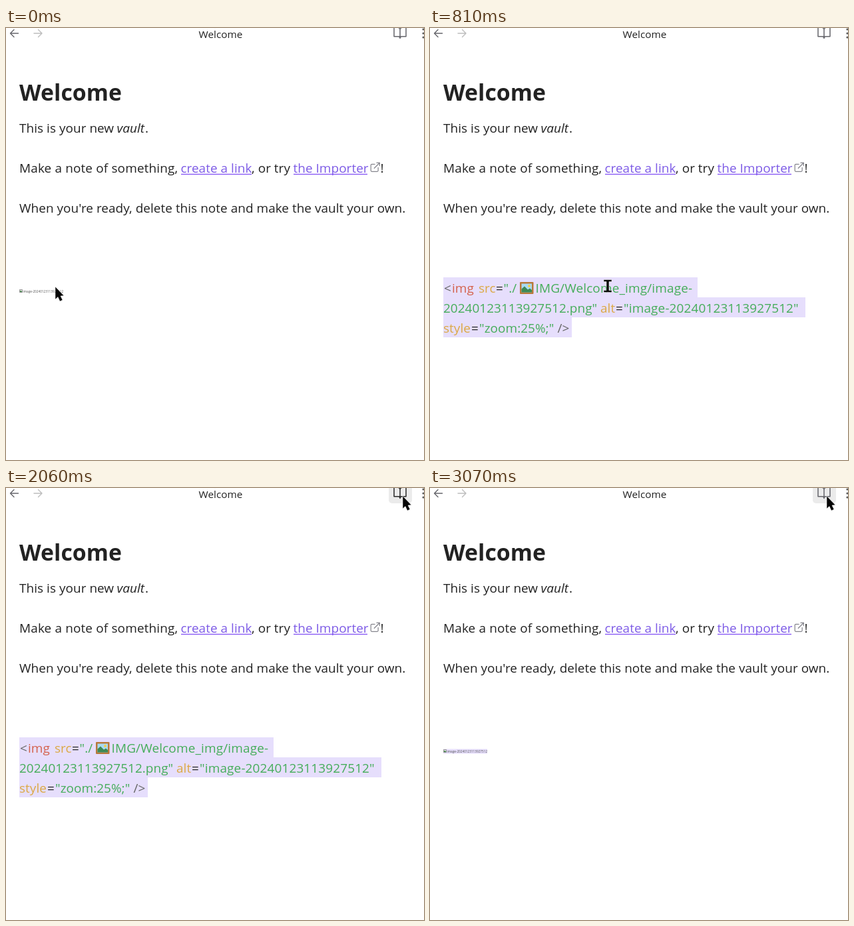
These frames come from a looping animation (628 px wide and 648 px high, 3.53 s). An HTML page:

```html
<!DOCTYPE html>
<html lang="en">
<head>
<meta charset="utf-8">
<title>Welcome</title>
<style>
  html, body { margin: 0; width: 100%; height: 100%; overflow: hidden; background: #fff; }
  svg { display: block; }
  text { font: 18.93px "Open Sans", "Noto Sans", sans-serif; letter-spacing: .05px; fill: #222; white-space: pre; }
  .title { font-size: 15.3px; text-anchor: middle; }
  .head { font-size: 33.8px; font-weight: 700; }
  .em { font-style: italic; }
  .loose { letter-spacing: .15px; }
  .link { fill: #7d5be6; }
  .line { fill: #8a5cf5; }
  .sel { fill: #e6defc; }
  .punct { fill: #666; }
  .tag { fill: #d4614c; }
  .attr { fill: #dca844; }
  .str { fill: #45ad5a; }
  .alt { font-size: 4.72px; letter-spacing: 0; fill: #555; }
  .icon { fill: none; stroke: #66666c; stroke-width: 1.7; stroke-linecap: round; stroke-linejoin: round; }
  .icon.hover { stroke: #2a2a2a; }
  .nav { stroke-width: 1.4; }
  .off { stroke: #bdbdbd; }
  .ext { stroke: #85858d; }
  .chev { fill: none; stroke: #f4f6ee; stroke-width: 1.4; }
</style>
</head>
<body>
<svg width="628" height="648" viewBox="0 0 628 648">
  <defs>
    <linearGradient id="grass" x2="0" y2="1">
      <stop offset="0" stop-color="#668f43"/>
      <stop offset=".1" stop-color="#76a34b"/>
      <stop offset=".45" stop-color="#82af4e"/>
      <stop offset=".72" stop-color="#78a442"/>
      <stop offset="1" stop-color="#668f36"/>
    </linearGradient>
  </defs>

  <!-- toolbar -->
  <rect id="button" x="575" y="-6" width="35" height="29" rx="5" fill="#ebebeb"/>
  <path class="icon nav" d="M18.5 8H7M12 2.5 6.5 8l5.5 5.5"/>
  <path class="icon nav off" d="M42 8h12M48.5 2.5 54 8l-5.5 5.5"/>
  <text class="title" x="322.5" y="15">Welcome</text>
  <path id="book" class="icon" transform="translate(581.2 -3.4) scale(.9)"
    d="M2 3h6a4 4 0 0 1 4 4v14a3 3 0 0 0-3-3H2zM22 3h-6a4 4 0 0 0-4 4v14a3 3 0 0 1 3-3h7z"/>
  <path id="pencil" class="icon" transform="translate(582.5 -1.8) scale(.82)"
    d="M17 3a2.85 2.83 0 1 1 4 4L7.5 20.5 2 22l1.5-5.5ZM15 5l4 4"/>
  <g fill="#5c5c5c">
    <circle cx="627" cy="2" r="1.6"/><circle cx="627" cy="8" r="1.6"/><circle cx="627" cy="14" r="1.6"/>
  </g>

  <!-- note text -->
  <text class="head" x="20" y="108.5">Welcome</text>
  <g id="p1">
    <text x="20" y="157">This is your new <tspan class="em" x="166.5">vault</tspan><tspan x="209">.</tspan></text>
  </g>
  <g id="p2">
    <text x="20" y="217"><tspan class="loose">Make a note of something, </tspan><tspan class="link" x="262.5">create a link</tspan><tspan x="369">, or try </tspan><tspan class="link" x="431.5">the Importer</tspan><tspan x="562.5">!</tspan></text>
    <rect class="line" x="263" y="218.7" width="106" height="1.4"/>
    <rect class="line" x="432" y="218.7" width="111" height="1.4"/>
    <path id="ext" class="icon ext"
      d="M18 13v6a2 2 0 0 1-2 2H5a2 2 0 0 1-2-2V8a2 2 0 0 1 2-2h6M15 3h6v6M10 14 21 3"/>
  </g>
  <g id="p3">
    <text x="20" y="277">When you're ready, delete this note and make the vault your own.</text>
  </g>

  <!-- collapsed image -->
  <g id="thumb">
    <rect id="thumbSel" class="sel" x="20" y="391.5" width="66" height="7"/>
    <path d="M20.5 392.5h4v4h-4z" fill="#fff" stroke="#777" stroke-width=".8"/>
    <path d="M21 396v-1.5l1.5-1 2 2.5z" fill="#4c8a52"/>
    <text class="alt" x="25.5" y="396.7">image-20240123113927512</text>
  </g>

  <!-- selected markup -->
  <g id="code">
    <path class="sel" d="M20 374h382v30h162v30H213v30H20z"/>
    <text y="397"><tspan class="punct" x="21">&lt;</tspan><tspan class="tag" x="33">img</tspan><tspan class="attr" x="73">src</tspan><tspan x="99">=</tspan><tspan class="str" x="110.5">"./</tspan><tspan class="str loose" x="158.5">IMG/Welcome_img/image-</tspan></text>
    <text y="427"><tspan class="str" x="20">20240123113927512.png"</tspan><tspan class="attr" x="256">alt</tspan><tspan x="279">=</tspan><tspan class="str loose" x="291">"image-20240123113927512"</tspan></text>
    <text y="457"><tspan class="attr" x="20">style</tspan><tspan x="62">=</tspan><tspan class="str" x="74">"zoom:25%;"</tspan><tspan class="punct" x="191.5">/&gt;</tspan></text>
    <g>
      <rect x="135" y="381" width="20.5" height="18" rx="1" fill="#b8793a"/>
      <rect x="137.5" y="383.5" width="15.5" height="13" fill="#a9daf2"/>
      <circle cx="149" cy="387" r="1.9" fill="#f6cf45"/>
      <path d="M137.5 396.5v-5l4.5-4 5 5 3-2 3 2.5v3.5z" fill="#3e8a55"/>
    </g>
  </g>
  <rect id="caret" x="19" y="375" width="1.2" height="27" fill="#222"/>

  <!-- rendered image -->
  <g id="photo">
    <rect x="20" y="286" width="511" height="319" fill="url(#grass)"/>
    <path d="M20 286.5h511" stroke="#54763a"/>
    <ellipse cx="265" cy="526" rx="155" ry="8" fill="#4f7a26" opacity=".55"/>
    <path d="M186 490C174 462 180 430 224 420 221 434 203 440 200 452 198 465 207 470 212 478z" fill="#efe9dc"/>
    <path d="M186 490C179 474 178 460 181 446L199 452C198 465 207 470 212 480z" fill="#72502e"/>
    <path d="M180 494C200 470 230 474 258 473 285 466 300 454 322 450L356 500C368 522 345 526 300 522 260 521 240 516 212 521 185 523 165 531 140 531 126 530 126 521 146 512 125 514 110 510 113 503 125 493 150 500 180 494z" fill="#e9e0d0"/>
    <path d="M183 489c10-17 30-18 46-13-5 11-28 11-46 13zM264 488c12-5 24 14 39 35-18 0-36-10-39-35z" fill="#b98a50"/>
    <path d="M299 463C308 440 335 426 358 434 372 441 370 456 382 469 384 481 372 482 360 488 354 500 342 504 325 499 309 494 300 482 299 463z" fill="#65421f"/>
    <path d="M298 465C305 448 320 440 330 452 326 464 321 473 306 477zM343 447c12-10 20-1 23 16l15 6c3 11-10 12-20 8-10-6-16-17-18-30z" fill="#2c2119"/>
    <path d="M340 431c10 1 19 6 23 16-8-4-16-9-23-16z" fill="#c3a070"/>
    <ellipse cx="384" cy="502" rx="32" ry="25" fill="#e8e8ec"/>
    <path d="M386 487l14 2 3 12-12 7-12-8zM355 493l12-6 5 7-7 9-11 1zM361 514l11 0 5 10c-7 0-13-4-16-10zM402 515l12-10c0 9-5 15-11 18zM379 478l12 0-5 4z" fill="#1f2221"/>
    <ellipse cx="350" cy="515" rx="11" ry="12" fill="#dccdab"/>
    <path class="chev" d="M37.5 438l-7 7.5 7 7.5M514.5 438l7 7.5-7 7.5"/>
  </g>

  <!-- pointers -->
  <path id="beam" d="M-6-9.5H6v3H2v13H6v3H-6v-3h4v-13h-4z" fill="#0b0b0b" stroke="#fff" stroke-width=".5"/>
  <path id="arrow" d="M0 0V19l4-3.5 3 6.5 4-2-3-6 5-.5z" fill="#050505" stroke="#fff" stroke-width=".5"/>
</svg>

<script>
  const LOOP = 3530;
  const el = id => document.getElementById(id);
  const show = (id, on) => el(id).setAttribute("visibility", on ? "visible" : "hidden");
  const move = (id, x, y) => el(id).setAttribute("transform", `translate(${x} ${y})`);
  const within = (t, a, b) => t >= a && t < b;

  // pointer stops: time, x, y
  const stops = [
    [0, 74, 388], [70, 72, 388], [130, 70, 387], [270, 69, 387],
    [470, 73, 387], [540, 88, 387], [620, 125, 387], [740, 194, 387],
    [810, 267, 387], [880, 342, 362], [950, 457, 340],
    [1080, 462, 326], [1150, 470, 284], [1220, 478, 226], [1290, 493, 150],
    [1360, 506, 134], [1430, 533, 104], [1490, 570, 74], [1560, 584, 62],
    [1630, 590, 48], [1700, 596, 34], [1770, 598, 20], [1840, 597, 14], [1910, 596, 12]
  ];

  function draw(t) {
    const [, x, y] = stops.filter(s => s[0] <= t).pop();
    const code = within(t, 70, 2130);
    const reading = within(t, 2340, 3070);
    const beam = within(t, 70, 1490);

    show("code", code);
    show("caret", code && (t - 70) % 1200 < 600);
    show("thumb", !code && !reading);
    show("thumbSel", t >= 2130 && !reading);
    show("photo", reading);
    show("button", t >= 1770);
    show("book", !reading);
    show("pencil", reading);
    el("book").classList.toggle("hover", within(t, 1770, 3070));

    move("p1", 0, reading ? 2 : 0);
    move("p2", 0, reading ? -8 : 0);
    move("p3", 0, reading ? -18 : 0);
    el("ext").setAttribute("transform", `translate(${reading ? 545 : 546} 200) scale(.73)`);

    show("beam", beam);
    show("arrow", !beam);
    move(beam ? "beam" : "arrow", x, y);
  }

  function tick() {
    draw(performance.now() % LOOP);
    requestAnimationFrame(tick);
  }
  tick();
</script>
</body>
</html>
```
